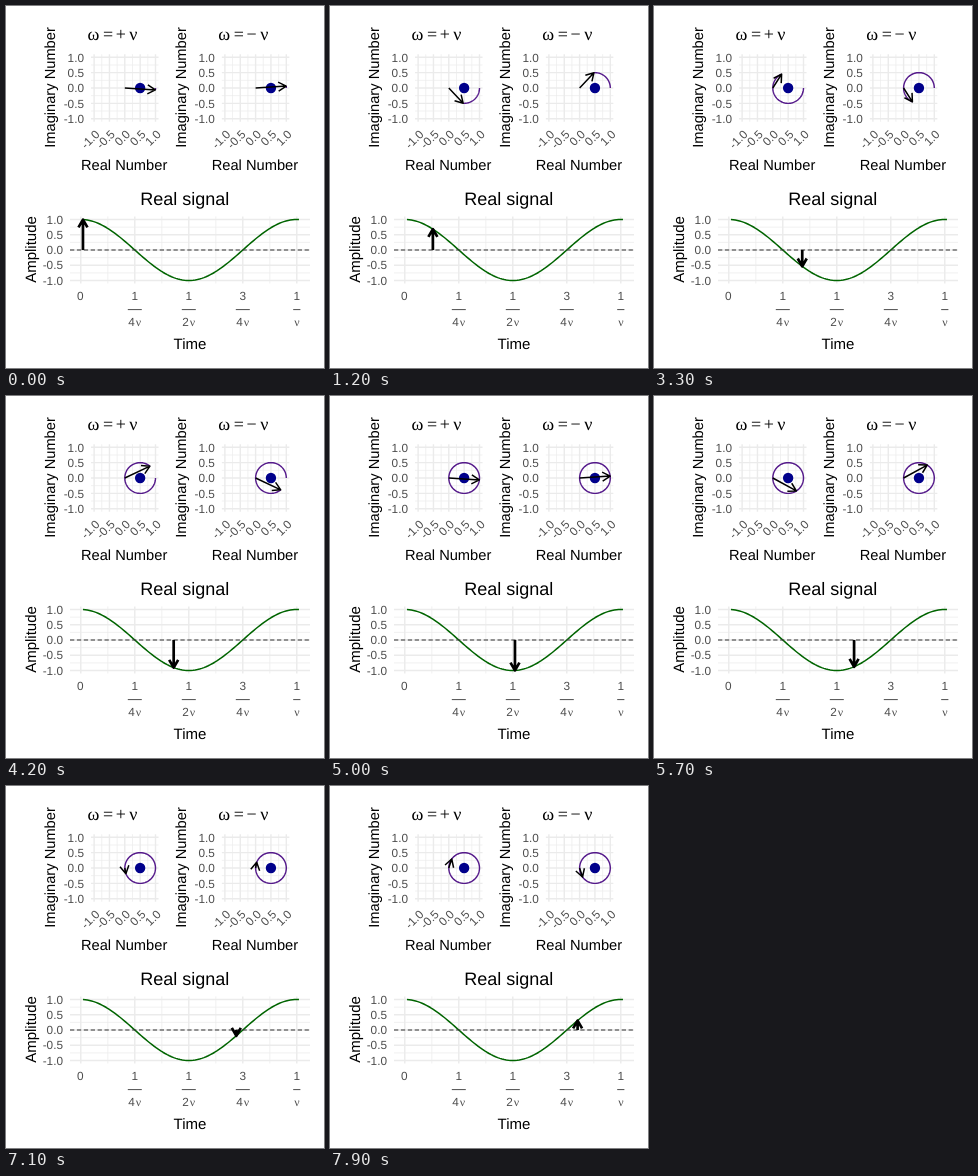
Animation of 318x362 px, one loop 8 s. Source, as an HTML page:

```html
<!DOCTYPE html>
<html lang="en">
<head>
<meta charset="utf-8">
<title>Rotating phasors and a real signal</title>
<style>
  html, body { margin: 0; width: 100%; height: 100%; overflow: hidden; background: #fff; }
  svg { display: block; }
  text { font-family: "Liberation Sans", Arial, sans-serif; font-size: 15px; fill: #000; text-rendering: geometricPrecision; }
  .small { font-size: 14.67px; }
  .tick { font-size: 11.8px; fill: #4d4d4d; }
  .title { font-size: 18px; }
  .greek { font-family: "Liberation Serif", "Times New Roman", serif; }
  .major, .minor { stroke: #ebebeb; stroke-width: 1.42; }
  .minor { stroke-width: .71; }
  .line { fill: none; stroke-linejoin: round; }
</style>
</head>
<body>
<svg id="stage" width="318" height="362" viewBox="0 0 318 362"></svg>
<script>
const stage = document.getElementById('stage');
const STEP = 100, STEPS = 80, TAU = 2 * Math.PI;
const HEAD = 9;
const levels = [-1, -.5, 0, .5, 1];

function add(tag, attrs, content) {
  const el = document.createElementNS('http://www.w3.org/2000/svg', tag);
  for (const key in attrs) el.setAttribute(key, attrs[key]);
  if (content !== undefined) el.textContent = content;
  return stage.appendChild(el);
}

function label(x, y, content, cls = '', anchor = 'middle', angle = 0) {
  return add('text', {
    x, y, class: cls, 'text-anchor': anchor,
    transform: `rotate(${angle} ${x} ${y})`
  }, content);
}

function stroke(color, width) {
  return add('path', { class: 'line', stroke: color, 'stroke-width': width });
}

// Grid lines for a panel; xs and ys are major positions with minors halfway.
function grid(xs, ys, left, right, top, bottom) {
  const between = list => list.slice(1).map((v, i) => (v + list[i]) / 2);
  const draw = (cls, cols, rows) => {
    const d = cols.map(x => `M${x} ${top}V${bottom}`).join('') +
              rows.map(y => `M${left} ${y}H${right}`).join('');
    add('path', { class: cls, d });
  };
  draw('minor', between(xs), between(ys));
  draw('major', xs, ys);
}

function curve(fn, from, to, count) {
  const points = [];
  for (let i = 0; i <= count; i++) {
    points.push(fn(from + (to - from) * i / count).map(v => v.toFixed(2)).join(' '));
  }
  return 'M' + points.join('L');
}

function arrow(x0, y0, x1, y1) {
  const angle = Math.atan2(y1 - y0, x1 - x0);
  const barb = turn => `${x1 - HEAD * Math.cos(angle + turn)} ${y1 - HEAD * Math.sin(angle + turn)}`;
  return `M${x0} ${y0}L${x1} ${y1}M${barb(Math.PI / 6)}L${x1} ${y1}L${barb(-Math.PI / 6)}`;
}

function phasorPanel(cx, direction, sign) {
  const cy = 82, unit = 30.7, half = unit * 1.1;
  const px = v => cx + v * unit, py = v => cy - v * unit;
  grid(levels.map(px), levels.map(py), cx - half, cx + half, cy - half, cy + half);
  for (const v of levels) {
    label(cx - 40.8, py(v) + 4.3, v.toFixed(1), 'tick', 'end');
    label(px(v) + 6.2, 129, v.toFixed(1), 'tick', 'end', -45);
  }
  label(cx - .7, 164, 'Real Number', 'small');
  label(cx - 69.5, 81.5, 'Imaginary Number', 'small', 'middle', -90);
  [['ω', -31.3], ['=', -16.7], [sign, -4], ['ν', 8.6]].forEach(([glyph, dx]) =>
    label(cx + dx, 34, glyph, 'title greek'));

  const tip = t => [
    px(.5 + .5 * Math.cos(2 * TAU * t)),
    py(.5 * direction * Math.sin(2 * TAU * t))
  ];
  const trail = stroke('#551a8b', 1.42);
  add('circle', { cx: px(.5), cy, r: 5.2, fill: '#00008b' });
  const hand = stroke('#000', 1.5);
  return t => {
    trail.setAttribute('d', curve(tip, 0, Math.min(t, .5), 60));
    hand.setAttribute('d', arrow(cx, cy, ...tip(t)));
  };
}

function fraction(x, top, digits) {
  label(x, 294, top, 'tick');
  const w = digits ? 7 : 3.6;
  add('path', { d: `M${x - w} 303.6H${x + w}`, stroke: '#4d4d4d', 'stroke-width': 1 });
  if (digits) label(x - 3.3, 320, digits, 'tick');
  label(x + (digits ? 3.6 : 0), 320, 'ν', 'tick greek');
}

function signalPanel() {
  const left = 64, right = 304, zero = 244;
  const px = t => 74.8 + 216 * t, py = v => zero - 30.5 * v;
  grid([0, .25, .5, .75, 1].map(px), levels.map(py), left, right, py(1.1), py(-1.1));
  levels.forEach(v => label(57, py(v) + 4.2, v.toFixed(1), 'tick', 'end'));
  label(px(0) - .4, 294, '0', 'tick');
  fraction(px(.25), '1', '4');
  fraction(px(.5), '1', '2');
  fraction(px(.75), '3', '4');
  fraction(px(1), '1', '');
  label(178.7, 199, 'Real signal', 'title');
  label(184, 343, 'Time');
  label(29.5, 243.5, 'Amplitude', '', 'middle', -90);

  const wave = t => [px(t), py(Math.cos(TAU * t))];
  stroke('#006400', 1.5).setAttribute('d', curve(wave, .01, 1.01, 100));
  const axis = stroke('#333', 1.07);
  axis.setAttribute('d', `M${left} ${zero}H${right}`);
  axis.setAttribute('stroke-dasharray', '4.3 2.6');
  const hand = stroke('#000', 2.7);
  return t => {
    const [x, y] = wave(t);
    hand.setAttribute('d', arrow(x, zero, x, y));
  };
}

const parts = [
  phasorPanel(118.8, -1, '+'),
  phasorPanel(249.6, 1, '−'),
  signalPanel()
];

const start = performance.now();
function render(now) {
  const step = Math.floor(Math.max(0, now - start) / STEP) % STEPS;
  const t = (step + 1) / 100;
  parts.forEach(update => update(t));
  requestAnimationFrame(render);
}
render(start);
</script>
</body>
</html>
```
